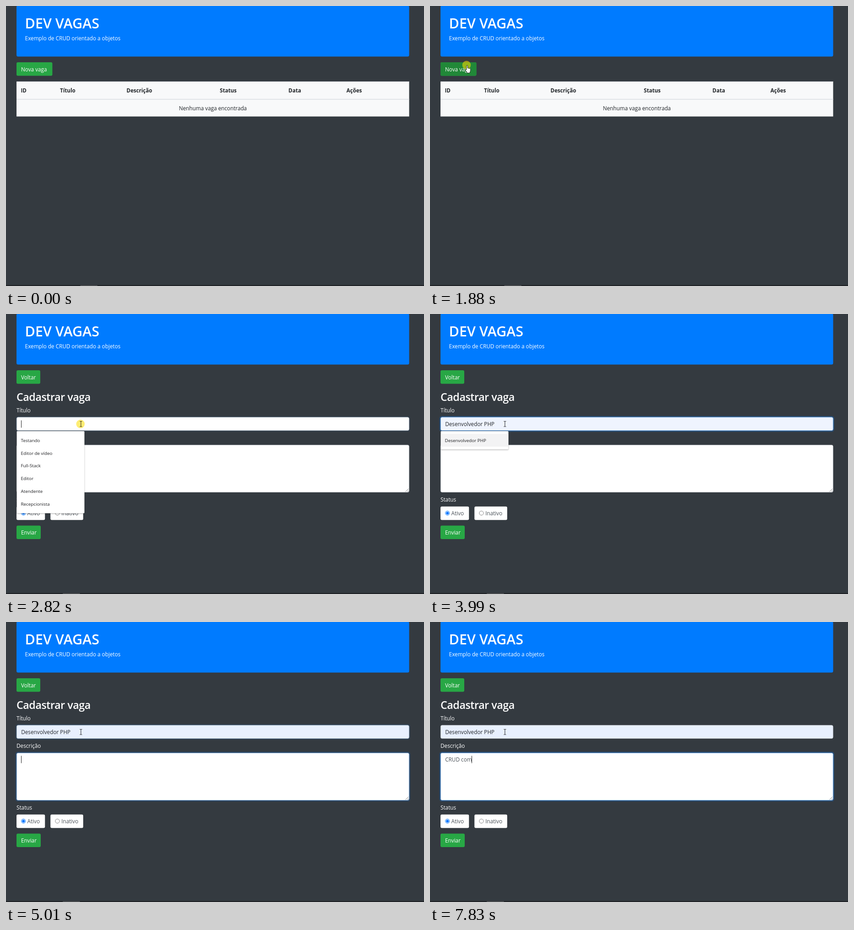
Write an HTML page that moves like this. It is 915x612 px and loops after 7990 ms.

```html
<!DOCTYPE html>
<html lang="pt-BR">
<head>
<meta charset="utf-8">
<title>Dev Vagas</title>
<style>
  html, body { margin: 0; width: 100%; height: 100%; overflow: hidden; background: #343a40; }
  svg { display: block; width: 915px; height: 612px; }
  text { font: 11.75px "Open Sans", "Noto Sans", sans-serif; fill: #fff; white-space: pre; }
  .h1 { font-size: 30.5px; font-weight: 600; }
  .h2 { font-size: 23.2px; font-weight: 600; letter-spacing: -.4px; }
  .th text { font-size: 11.6px; font-weight: 700; fill: #212529; }
  .dark { fill: #212529; }
  .grey { fill: #495057; }
  .item { font-size: 9.85px; fill: #202124; }
  .link { font-size: 8.1px; fill: #9aa0a6; }
  .green { fill: #28a745; }
  .field { fill: #fff; stroke: #ced4da; stroke-width: .8; }
  .ring { fill: none; stroke: #007bff; stroke-opacity: .25; stroke-width: 2.5; }
  .edge { fill: none; stroke: #80bdff; stroke-width: .8; }
  #menu { filter: drop-shadow(0 1px 1px rgba(0, 0, 0, .35)); }
</style>
</head>
<body>
<svg viewBox="0 0 915 612">
  <rect width="915" height="612" fill="#343a40"/>
  <rect x="23" y="-1" width="859.5" height="111.6" rx="3.5" fill="#007bff"/>
  <text class="h1" x="41.6" y="49">DEV VAGAS</text>
  <text x="41.6" y="75.2">Exemplo de CRUD orientado a objetos</text>

  <g id="list">
    <rect class="green" x="23" y="123" width="78.5" height="29.5" rx="3"/>
    <rect id="hover" x="23" y="123" width="78.5" height="29.5" rx="3" fill="#218838"/>
    <text x="33" y="142.6">Nova vaga</text>
    <rect x="23" y="165" width="859.5" height="76.5" fill="#f8f9fa"/>
    <path d="M23 165.4H882.5" stroke="#dee2e6" stroke-width=".8"/>
    <path d="M23 203.9H882.5" stroke="#dee2e6" stroke-width="1.6"/>
    <g class="th">
      <text x="32.5" y="189">ID</text>
      <text x="118.3" y="189">Título</text>
      <text x="263.8" y="189">Descrição</text>
      <text x="468" y="189">Status</text>
      <text x="618.3" y="189">Data</text>
      <text x="745.3" y="189">Ações</text>
    </g>
    <text class="dark" x="452.8" y="227.6" text-anchor="middle">Nenhuma vaga encontrada</text>
  </g>

  <g id="form">
    <rect class="green" x="23" y="123" width="52" height="29.5" rx="3"/>
    <text x="33" y="142.6">Voltar</text>
    <text class="h2" x="23" y="190">Cadastrar vaga</text>
    <text x="23" y="215">Título</text>
    <text x="23" y="275.4">Descrição</text>
    <text x="23" y="410">Status</text>

    <rect id="titleBox" class="field" x="23.4" y="225.8" width="858.8" height="28.8" rx="3"/>
    <g id="titleFocus">
      <rect class="ring" x="21.75" y="224.15" width="862" height="32" rx="4"/>
      <rect class="edge" x="23.4" y="225.8" width="858.8" height="28.8" rx="3"/>
    </g>
    <text id="title" class="grey" x="33.2" y="245.2"></text>

    <rect class="field" x="23.4" y="286.4" width="858.8" height="103" rx="3"/>
    <g id="descFocus">
      <rect class="ring" x="21.75" y="284.75" width="862" height="106.3" rx="4"/>
      <rect class="edge" x="23.4" y="286.4" width="858.8" height="103" rx="3"/>
    </g>
    <path d="M874.5 388.5L881 382M878.5 388.5L881 386" stroke="#777" stroke-width=".9"/>
    <text id="desc" class="grey" x="33.2" y="305.2"></text>

    <rect x="23" y="420.7" width="62.3" height="29.5" rx="3" fill="#fff"/>
    <rect x="97.3" y="420.7" width="71.7" height="29.5" rx="3" fill="#fff"/>
    <circle cx="38.2" cy="435.2" r="4.6" fill="#fff" stroke="#0075ff" stroke-width="1"/>
    <circle cx="38.2" cy="435.2" r="3" fill="#0075ff"/>
    <circle cx="112.5" cy="435.2" r="4.6" fill="#fff" stroke="#767676" stroke-width=".9"/>
    <text class="grey" x="46.5" y="440">Ativo</text>
    <text class="grey" x="121.2" y="440">Inativo</text>
    <rect class="green" x="23" y="462.5" width="53" height="29.5" rx="3"/>
    <text x="33" y="482">Enviar</text>

    <rect id="caret" width="1" height="16" fill="#222"/>
    <g id="menu">
      <rect id="menuBox" x="23.5" y="256" width="148.2" rx="1.5" fill="#fff"/>
      <rect id="menuHit" x="23.5" y="262" width="148.2" height="28" fill="#e8e8e9"/>
      <g id="items"></g>
    </g>
  </g>

  <rect y="609.8" width="915" height="2.2" fill="#202327"/>
  <rect id="thumb" y="610.4" width="37.5" height="1.6" fill="#55585c"/>
  <g id="status">
    <path d="M0 594.5H46Q48 594.5 48 596.5V610H0Z" fill="#202124"/>
    <text class="link" x="43" y="605.6" text-anchor="end">cadastrar.php</text>
  </g>

  <circle id="click" r="9.3" fill="#ffde00" fill-opacity=".55"/>
  <g id="cursor">
    <path id="arrow" d="M0 0V12.6L2.9 9.9L4.8 14.2L6.7 13.4L4.8 9.2H8.8Z" fill="#fff" stroke="#000" stroke-width=".7"/>
    <path id="hand" transform="translate(-3 0)" d="M3 2C3 .2 5.4 .2 5.4 2V6.6L10.3 7.7Q12 8.2 11.8 10L11 14Q10.6 17.5 8.5 17.5H5L1 11.6Q0 9.8 1.4 9.3L3 10.4Z" fill="#fff" stroke="#000" stroke-width=".8"/>
    <path id="beam" d="M-2.5 -5.8H-.7L0 -5.2L.7 -5.8H2.5M0 -5.2V5.2M-2.5 5.8H-.7L0 5.2L.7 5.8H2.5" fill="none" stroke="#111" stroke-width=".95"/>
  </g>
</svg>
<script>
const LOOP = 7990, FORM_AT = 1970;
const FULL = 'Desenvolvedor PHP';
const $ = id => document.getElementById(id);
const show = (id, on) => { $(id).style.display = on ? '' : 'none'; };

// Each table holds [start time, value...]; a value stays until the next start.
const pointer = [
  [0, 'none', 0, 0],
  [70, 'arrow', 856, 566], [150, 'arrow', 690, 430], [220, 'arrow', 500, 300],
  [300, 'arrow', 360, 208], [370, 'arrow', 296, 173],
  [530, 'arrow', 300, 170], [620, 'arrow', 312, 172], [700, 'arrow', 320, 174], [870, 'arrow', 320, 177],
  [1180, 'arrow', 310, 175], [1260, 'arrow', 285, 171], [1340, 'arrow', 250, 164], [1410, 'arrow', 208, 155],
  [1490, 'arrow', 165, 147], [1570, 'arrow', 130, 139], [1650, 'arrow', 104, 133],
  [1730, 'hand', 88, 130], [1800, 'hand', 80, 129],
  [2040, 'arrow', 88, 140], [2120, 'arrow', 105, 165], [2200, 'arrow', 128, 194], [2280, 'arrow', 146, 219],
  [2350, 'beam', 158, 238], [2430, 'beam', 164, 247], [2590, 'beam', 164, 243], [2670, 'beam', 164, 240.3]
];
const hover = [[0, 0], [1730, .5], [1800, 1]];
const title = [[0, ''], [3220, 'D'], [3530, 'De'], [3990, FULL]];
const desc = [[0, ''], [5710, 'C'], [6030, 'CR'], [6110, 'CRU'], [6340, 'CRUD'], [6500, 'CRUD '],
  [7050, 'CRUD o'], [7360, 'CRUD '], [7440, 'CRUD c'], [7600, 'CRUD co'], [7830, 'CRUD com']];
const titleFocus = [[0, 0], [2820, .15], [2900, .7], [2980, 1], [4930, .8], [5000, .3], [5080, 0]];
const descFocus = [[0, 0], [4930, .2], [5000, .7], [5080, 1]];
const caret = [[0, ''], [2820, 'title'], [3990, ''], [4390, 'title'], [4930, 'desc'], [5480, ''], [5710, 'desc']];
const titleFill = [[0, '#fff'], [3990, '#eff4fe'], [4070, '#e8f0fe']];
const menuHit = [[0, 0], [3990, .5], [4070, 1]];
const menu = [
  [0, []],
  [2820, ['Testando', 'Editor de vídeo', 'Full-Stack', 'Editor', 'Atendente', 'Recepcionista']],
  [3220, [FULL]],
  [4390, []]
];

const at = (table, t) => table.findLast(row => row[0] <= t).slice(1);
const value = (table, t) => at(table, t)[0];
const within = (t, a, b) => t >= a && t < b;

const pen = document.createElement('canvas').getContext('2d');
function textWidth(s) {
  pen.font = '11.75px "Open Sans", "Noto Sans", sans-serif';
  return pen.measureText(s).width;
}

let shownItems = null;
function drawMenu(t) {
  const items = value(menu, t);
  show('menu', items.length);
  $('menuHit').style.opacity = value(menuHit, t);
  if (items === shownItems) return;
  shownItems = items;
  $('menuBox').setAttribute('height', 12 + items.length * 27.9);
  $('items').innerHTML = items
    .map((s, i) => `<text class="item" x="32.5" y="${279.6 + i * 27.9}">${s}</text>`).join('');
}

function drawPointer(t) {
  const [kind, x, y] = at(pointer, t);
  for (const id of ['arrow', 'hand', 'beam']) show(id, id === kind);
  $('cursor').setAttribute('transform', `translate(${x} ${y})`);
  $('click').setAttribute('transform', `translate(${x - (kind === 'beam' ? 1 : 0)} ${y})`);
  show('click', within(t, 1880, FORM_AT) || within(t, 2820, 2900));
}

function drawForm(t) {
  const text = { title: value(title, t), desc: value(desc, t) };
  for (const id in text) $(id).textContent = text[id];
  $('title').style.fill = t >= 3990 ? '#212529' : '';
  $('titleBox').style.fill = value(titleFill, t);
  $('titleFocus').style.opacity = value(titleFocus, t);
  $('descFocus').style.opacity = value(descFocus, t);
  const owner = value(caret, t);
  show('caret', owner);
  if (owner) {
    $('caret').setAttribute('x', Math.round(33 + textWidth(text[owner])));
    $('caret').setAttribute('y', owner === 'title' ? 232.5 : 292.5);
  }
  drawMenu(t);
}

function draw(t) {
  const onForm = t >= FORM_AT;
  show('list', !onForm);
  show('form', onForm);
  $('hover').style.opacity = value(hover, t);
  show('status', within(t, FORM_AT, 2120));
  show('thumb', !within(t, FORM_AT, 2120));
  $('thumb').setAttribute('x', onForm ? 124.3 : 162.6);
  drawForm(t);
  drawPointer(t);
}

const start = performance.now();
function tick() {
  draw((performance.now() - start) % LOOP);
  requestAnimationFrame(tick);
}
tick();
</script>
</body>
</html>
```
